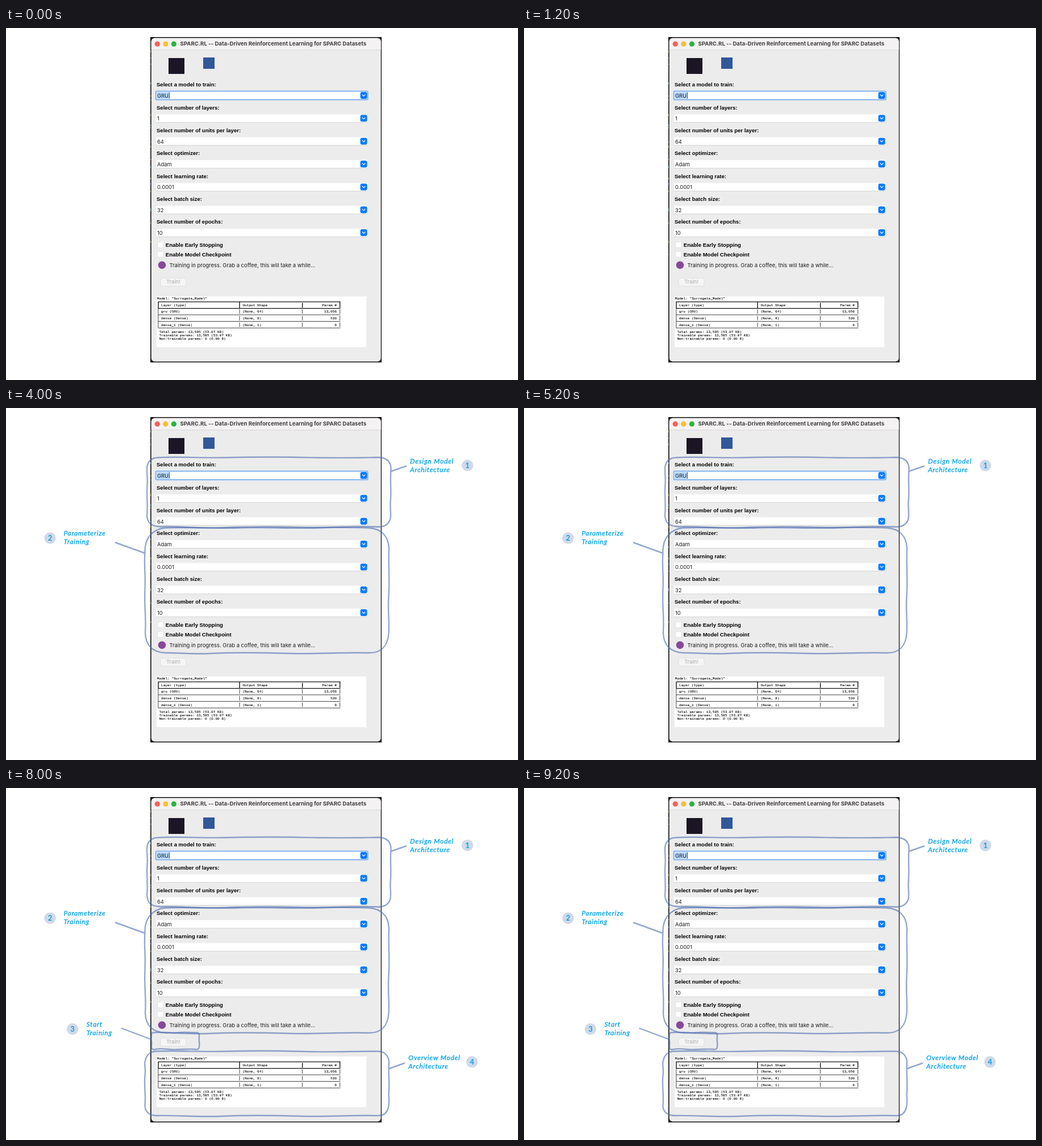
Recreate the animation shown at these times as an HTML page. Size 901 by 621 pixels, loop 10 s.

```html
<!DOCTYPE html>
<html lang="en">
<head>
<meta charset="utf-8">
<title>Model training window</title>
<style>
html, body { margin: 0; width: 100%; height: 100%; overflow: hidden; background: #fff; }
svg { display: block; width: 901px; height: 621px; }
.ui { font: 9.45px Inter, "Liberation Sans", sans-serif; fill: #1d1d1d; }
.title { font-weight: 700; font-size: 9.65px; fill: #404040; }
.label { font: bold 9.53px "Liberation Sans", Arial, sans-serif; fill: #000; }
.mono { font: 6.12px "Liberation Mono", monospace; fill: #000; stroke: #000; stroke-width: .08; white-space: pre; }
.end { text-anchor: end; }
.ink { fill: none; stroke: #4a6bb0; stroke-opacity: .6; stroke-width: 2.4; stroke-linecap: round; stroke-linejoin: round; }
.note { font: italic 12px Lato, sans-serif; letter-spacing: .75px; fill: #0aa2ea; stroke: #0aa2ea; stroke-width: .35; }
.badge { fill: #d0d9e8; }
.num { font: bold 13px Lato, sans-serif; fill: #0f9fe4; text-anchor: middle; }
.step { animation: 10s step-end infinite; }
#s1 { animation-name: show1; }
#s2 { animation-name: show2; }
#s3 { animation-name: show3; }
#s4 { animation-name: show4; }
@keyframes show1 { 0% { opacity: 0 } 20%, 100% { opacity: 1 } }
@keyframes show2 { 0% { opacity: 0 } 40%, 100% { opacity: 1 } }
@keyframes show3 { 0% { opacity: 0 } 60%, 100% { opacity: 1 } }
@keyframes show4 { 0% { opacity: 0 } 80%, 100% { opacity: 1 } }
</style>
</head>
<body>
<svg viewBox="0 0 901 621" xmlns="http://www.w3.org/2000/svg">
  <!-- window -->
  <rect x="254" y="16" width="407" height="574" fill="#151515"/>
  <path d="M254.6 40V400" stroke="#8b9a4c" stroke-width=".8" stroke-dasharray="3 20 2 31" fill="none"/>
  <path d="M254.6 52V330" stroke="#4d86a8" stroke-width=".8" stroke-dasharray="2 42 3 27" fill="none"/>
  <rect x="255.7" y="17.8" width="404" height="570.6" rx="6" fill="#ececec"/>
  <path d="M255.7 38.5V23.8a6 6 0 0 1 6-6h392a6 6 0 0 1 6 6V38.5z" fill="#f4f2f2"/>
  <path d="M255.7 38.8h404" stroke="#d6d4d4" stroke-width=".8"/>
  <circle cx="266.2" cy="28.2" r="4.6" fill="#fe5f57"/>
  <circle cx="280.8" cy="28.2" r="4.6" fill="#febc2e"/>
  <circle cx="295.4" cy="28.2" r="4.6" fill="#28b53f"/>
  <text class="ui title" x="306.5" y="31.2">SPARC.RL -- Data-Driven Reinforcement Learning for SPARC Datasets</text>
  <rect x="286" y="53" width="28" height="28" fill="#1b1525"/>
  <rect x="347" y="52" width="20" height="20" fill="#31579b"/>

  <g id="fields"></g>

  <!-- options and status -->
  <g fill="#fff" stroke="#d9d9d9" stroke-width=".6">
    <rect x="266.8" y="377.4" width="10.2" height="10.2" rx="2.4"/>
    <rect x="266.8" y="394.4" width="10.2" height="10.2" rx="2.4"/>
  </g>
  <text class="label" x="280.8" y="386">Enable Early Stopping</text>
  <text class="label" x="280.8" y="403">Enable Model Checkpoint</text>
  <circle cx="274.5" cy="418.3" r="6.8" fill="#87479b"/>
  <text class="ui" x="287.4" y="422.4">Training in progress. Grab a coffee, this will take a while...</text>
  <rect x="272" y="441.2" width="45" height="14.2" rx="3" fill="#f5f5f5" stroke="#d8d8d8" stroke-width=".7"/>
  <text class="ui" x="294.4" y="451.4" text-anchor="middle" style="fill:#ababab">Train!</text>

  <!-- summary -->
  <rect x="265" y="473.6" width="369" height="89.4" fill="#fff"/>
  <text class="mono" x="265.8" y="479">Model: "Surrogate_Model"</text>
  <g id="rows"></g>
  <g fill="none" stroke="#111">
    <path d="M267.8 483.2H588.4M267.8 494.6H588.4" stroke-width="1.3"/>
    <path d="M267.8 506H588.4M267.8 517.6H588.4M267.8 529.2H588.4" stroke-width=".8"/>
    <path id="bars" stroke-width=".8"/>
    <path d="M268 483V494.6M411 483V494.6M521.6 485V493.4M587.6 483V493.4" stroke-width="1.4"/>
  </g>
  <text class="mono" x="269.4" y="537.8">Total params: 13,585 (53.07 KB)</text>
  <text class="mono" x="269.4" y="543.7">Trainable params: 13,585 (53.07 KB)</text>
  <text class="mono" x="269.4" y="549.5">Non-trainable params: 0 (0.00 B)</text>

  <!-- callouts -->
  <g id="s1" class="step">
    <path class="ink" d="M267 87.5C300 85 340 88.5 385 87.5S470 86 515 87S600 88.5 655 87C669 87.5 677.5 94 677.5 108C675.5 130 678.5 145 676.5 165C675.5 180 678.5 188 676 197C672 207 663 211 650 209.5C600 208 570 212 520 210.5S430 209 385 211S300 208 272 209.5C256 209 249 203 248 190C250 170 247 155 248.500 135C249.500 120 247 113 248.500 102C251 92 257 88 267 87.5ZM678 111.5L704 102.5"/>
    <text class="note" x="711" y="97.6">Design Model</text>
    <text class="note" x="711" y="112.6">Architecture</text>
    <circle class="badge" cx="812" cy="101.3" r="10.2"/>
    <text class="num" x="812" y="105.6">1</text>
  </g>
  <g id="s2" class="step">
    <path class="ink" d="M280 211.5C320 209.500 360 213 410 211.5S500 213 550 211.5S610 211 638 211.5C661 213 673 226 674 248C672.5 275 675.5 300 673.5 330S675 375 673.5 397C672 420 660 433 637 432C590 430.500 550 434.5 500 433S400 431 360 433S310 431.5 281 432C258 431 246 419 245 397C247 370 243 350 244.500 320S242.500 280 244.500 255C243.500 232 256 214 280 211.5ZM193 237.500L244 256"/>
    <text class="note" x="101.5" y="225.3">Parameterize</text>
    <text class="note" x="101.5" y="240.3">Training</text>
    <circle class="badge" cx="77.5" cy="229.6" r="10.2"/>
    <text class="num" x="77.5" y="234">2</text>
  </g>
  <g id="s3" class="step">
    <path class="ink" d="M259 431.5C275 429.5 288 433 303 431.5S325 432 336 431.5C339.5 432 340.5 434 340 438C338.5 445 341.5 450 340 457C339.5 460.5 338 461.5 334 461C318 459.5 300 462.5 286 461S270 460 260 461.5C256.5 461 255.5 459 256 455C257.5 448 254.5 444 256 436C256 433 257 431.5 259 431.5ZM203.5 424L255.5 443.5"/>
    <text class="note" x="141.5" y="421.3">Start</text>
    <text class="note" x="141.5" y="436.3">Training</text>
    <circle class="badge" cx="117" cy="425.2" r="10.2"/>
    <text class="num" x="117" y="429.6">3</text>
  </g>
  <g id="s4" class="step">
    <path class="ink" d="M264 464.5C305 462.5 340 466 390 464.5S480 463.5 530 465S610 464 655 464.5C667 465 674 473 674 485C672.5 505 675.5 520 673.5 540C674.5 550 674 554 673.5 560C672 572 665 579 652 578C610 576.5 570 580.5 520 579S420 577 380 579S300 577 264 578C252 577.5 244.500 571 244.500 560C246.500 540 242.500 525 244.500 508S242.500 490 245 481C247 471 254 465 264 464.5ZM674.500 495L701 485.5"/>
    <text class="note" x="708" y="479.8">Overview Model</text>
    <text class="note" x="708" y="494.8">Architecture</text>
    <circle class="badge" cx="820" cy="483.3" r="10.2"/>
    <text class="num" x="820" y="487.7">4</text>
  </g>
</svg>
<script>
const byId = id => document.getElementById(id);

const fields = [
  ["Select a model to train:", "GRU"],
  ["Select number of layers:", "1"],
  ["Select number of units per layer:", "64"],
  ["Select optimizer:", "Adam"],
  ["Select learning rate:", "0.0001"],
  ["Select batch size:", "32"],
  ["Select number of epochs:", "10"]
];
byId("fields").innerHTML = fields.map(([label, value], i) => {
  const y = 119 + i * 40.35;
  const focused = i === 0;
  const ring = focused
    ? `<rect x="263.6" y="${y - 7.4}" width="373" height="14.8" rx="1.5" fill="none" stroke="#80b3ef" stroke-width="2"/>
       <rect x="265.4" y="${y - 5.8}" width="22" height="11.6" fill="#b3d7ff"/>
       <path d="M287.4 ${y - 5.6}v11.2" stroke="#111" stroke-width=".8"/>`
    : "";
  return `<text class="label" x="265" y="${y - 15.8}">${label}</text>
    <rect x="264.2" y="${y - 7}" width="371.6" height="14" fill="#fff"/>
    <path d="M264.2 ${y + 7.2}h371.6" stroke="#cfcfcf" stroke-width=".8"/>
    ${ring}
    <text class="ui" x="266" y="${y + 3.9}">${value}</text>
    <rect x="623.5" y="${y - 6}" width="12" height="12" rx="3" fill="#0a7aff"/>
    <path d="M627.2 ${y - 1.1}l2.3 2.3l2.3 -2.3" fill="none" stroke="#fff" stroke-width="1.2" stroke-linecap="round" stroke-linejoin="round"/>`;
}).join("");

const rows = [
  ["Layer (type)", "Output Shape", "Param #"],
  ["gru (GRU)", "(None, 64)", "13,056"],
  ["dense (Dense)", "(None, 8)", "520"],
  ["dense_1 (Dense)", "(None, 1)", "9"]
];
byId("rows").innerHTML = rows.map(([layer, shape, params], i) => {
  const y = 490.6 + i * 11.65;
  return `<text class="mono" x="273" y="${y}">${layer}</text>
    <text class="mono" x="416.4" y="${y}">${shape}</text>
    <text class="mono end" x="582" y="${y}">${params}</text>`;
}).join("");

// Table column rules, with small gaps between lines of text
let bars = "M267.8 494.6V529.2";
for (const x of [411, 521.4, 587.6])
  for (let i = 0; i < 3; i++) bars += `M${x} ${496.4 + i * 11.6}v7.8`;
byId("bars").setAttribute("d", bars);
</script>
</body>
</html>
```
